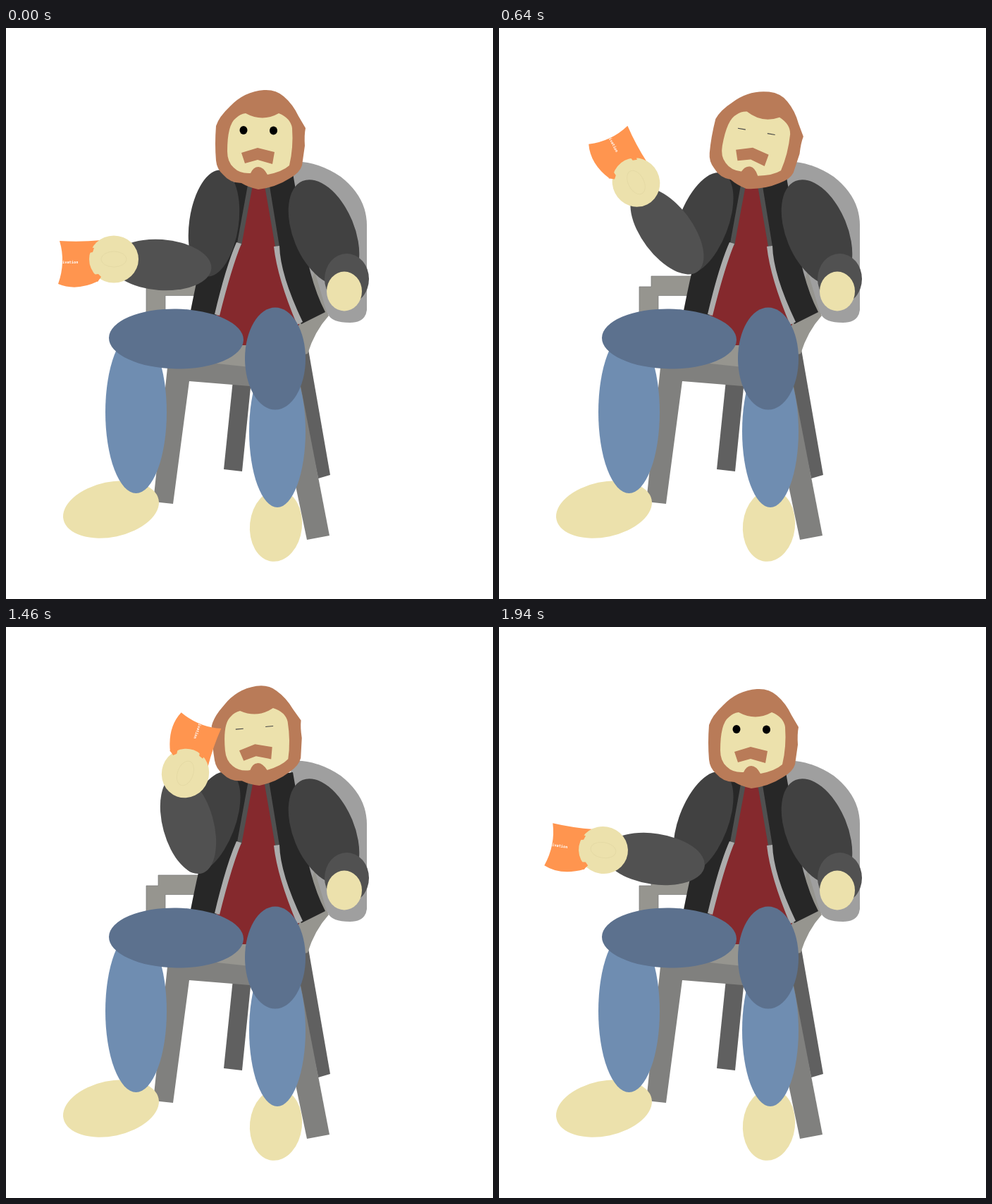
An HTML page for the animation above (2020 ms loop, 691x810 px).

```html
<!DOCTYPE html>
<html lang="en">
<head>
<meta charset="utf-8">
<title>Snack in a chair</title>
<style>
  html, body { margin: 0; width: 100%; height: 100%; overflow: hidden; background: #fff; }
  svg { display: block; width: 691px; height: 810px; }
  .skin { fill: #ece1ac; }
  .hair { fill: #b97b58; }
  .frame { fill: #96958f; }
  .leg { fill: #80807e; }
  .back-leg { fill: #606060; }
  .jacket { fill: #272727; }
  .collar { fill: #505050; }
  .lining { fill: #acacac; }
  .sleeve { fill: #414141; }
  .cuff { fill: #515151; }
  .thigh { fill: #5c718e; }
  .shin { fill: #6f8db1; }
  .bag { fill: #ff954f; }
  text { font: bold 5.3px "DejaVu Sans Mono", monospace; fill: #fff; }
</style>
</head>
<body>
<svg viewBox="0 0 691 810">
  <g id="chair">
    <path fill="#9f9f9f" d="M408 190Q440 188 475 211Q512 240 512 280V400Q510 418 488 418Q462 418 457 406L430 406V300L400 220Z"/>
    <path class="back-leg" d="M322 500L348 500L335 629L309 626Z"/>
    <path class="back-leg" d="M424 462L429 456L460 634L443 639L415 505Z"/>
    <path class="leg" d="M229 482L300 472L346 478V508L260 501L237 675L209 672Z"/>
    <path class="leg" d="M390 550L418 508L459 720L427 726Z"/>
    <path class="frame" d="M290 475L335 445L415 415L438 345L455 403L458 408Q438 430 428 462L346 481Z"/>
    <path class="frame" stroke="#777" stroke-width=".7" d="M199 367H216V352H285V379.500H226V410H199Z"/>
  </g>

  <g id="torso">
    <path class="jacket" d="M330 205L280 320Q272 350 262 401L298 409L345 330L351 212Z"/>
    <path class="jacket" d="M366 212L407 206L418 270Q428 355 453 403L419 420L380 320Z"/>
    <path fill="#85292d" d="M350 212H368L383 308Q390 350 416 421L380 450H325L299 407Q316 345 331 305Z"/>
    <path class="collar" d="M345 212L352 212L334 309L328 305Z"/>
    <path class="collar" d="M365 212L372 212L388 310L382 310Z"/>
    <path class="lining" d="M327 304L334 306Q320 340 303 408L296 406Q312 338 327 304Z"/>
    <path class="lining" d="M380 310L388 309Q389 350 421 417L413 421Q385 355 380 310Z"/>
  </g>

  <g id="legs">
    <ellipse class="skin" rx="69" ry="39" transform="translate(149 683) rotate(-12)"/>
    <ellipse class="skin" rx="37" ry="51" transform="translate(383 706) rotate(6)"/>
    <ellipse class="shin" cx="184.500" cy="545" rx="43.500" ry="115"/>
    <ellipse class="shin" cx="385" cy="572" rx="40" ry="108"/>
    <ellipse class="thigh" rx="95.500" ry="42.500" transform="translate(241.500 441) rotate(1)"/>
    <ellipse class="thigh" cx="382" cy="469" rx="43" ry="72.500"/>
  </g>

  <g id="resting-arm">
    <ellipse class="sleeve" rx="79" ry="43.500" transform="translate(451 290) rotate(67.500)"/>
    <ellipse class="cuff" cx="483.500" cy="356" rx="31.500" ry="36"/>
    <ellipse class="skin" cx="480" cy="373.500" rx="25" ry="28"/>
  </g>

  <ellipse id="upperArm" class="sleeve" rx="35" ry="76"/>

  <g id="head">
    <path class="hair" d="M366 88Q383 87 394 97Q407 108 415 125L425 142Q423 152 424 167L420 195Q417 205 403 213Q383 226 358 229Q344 226 334 220Q318 220 308 208Q299 200 298 188Q296 165 298 139Q302 126 318 111Q338 90 366 88Z"/>
    <path class="skin" d="M326 128Q332 122 340 121Q364 134 387 121Q404 128 406 142Q408 170 402 195Q392 204 371 208Q365 197 358 197Q351 197 347 206Q332 207 323 198Q314 190 314 175Q314 137 326 128Z"/>
    <path class="hair" d="M334 177L357 170L381 176L378 193L357 187L339 192Z"/>
    <g id="eyesOpen">
      <ellipse cx="337" cy="145" rx="5.500" ry="6"/>
      <ellipse cx="379.500" cy="145.500" rx="5.500" ry="6"/>
    </g>
    <path id="eyesShut" d="M331.500 146.500H342.500M374 146.500H385" stroke="#444" stroke-width="1.100"/>
  </g>

  <ellipse id="forearm" class="cuff" rx="72" ry="36"/>

  <g id="hand">
    <path class="bag" d="M-77 -26Q-68 4 -79 35Q-53 46 -22 31L-18 -27Q-48 -24 -77 -26Z"/>
    <text x="-73" y="6">ivation</text>
    <ellipse class="skin" rx="35" ry="33.500"/>
    <ellipse rx="18" ry="11" fill="none" stroke="#e5daa5"/>
    <path class="bag" d="M-35 -17L-28 -16L-30 -10L-35 -9ZM-31 22L-22 21L-18 25L-23 32Z"/>
  </g>
</svg>
<script>
  const part = id => document.getElementById(id);

  // Each placement is [x, y, degrees].
  const SHOULDER_LOW = [295, 277, 8], SHOULDER = [290, 277, 21];
  const HEAD_STRAIGHT = [360, 190, 0], HEAD_TILTED = [359.5, 190, 10], HEAD_BACK = [358, 186, -5];

  const pose = (upperArm, forearm, hand, head, awake = false) =>
    ({ upperArm, forearm, hand, head, awake });

  const poses = {
    low:   pose(SHOULDER_LOW, [219.5, 336, 4], [153, 328, 0], HEAD_STRAIGHT, true),
    shake: pose(SHOULDER, [220.5, 329, 8.5], [148, 316.5, 9.4], HEAD_STRAIGHT, true),
    lift:  pose(SHOULDER, [225, 309, 27], [156.5, 272, 31], HEAD_STRAIGHT),
    raise: pose(SHOULDER, [238.5, 288, 53], [194.5, 219, 62.8], HEAD_TILTED),
    near:  pose(SHOULDER, [258.5, 280, 74.5], [254.5, 207.5, 110], HEAD_BACK),
    eat:   pose(SHOULDER, [285, 277, 99], [293, 216, 134], HEAD_BACK)
  };

  const steps = [
    [0, "low"], [80, "shake"], [160, "low"], [240, "shake"], [320, "low"], [400, "shake"],
    [480, "lift"], [640, "raise"], [800, "near"], [960, "eat"],
    [1460, "near"], [1620, "raise"], [1780, "lift"], [1940, "shake"]
  ];
  const LOOP = 2020;

  function place(id, [x, y, angle], pivot = "") {
    part(id).setAttribute("transform", `translate(${x} ${y}) rotate(${angle}) ${pivot}`);
  }

  function show({ upperArm, forearm, hand, head, awake }) {
    place("upperArm", upperArm);
    place("forearm", forearm);
    place("hand", hand);
    place("head", head, "translate(-360 -190)");
    part("eyesOpen").style.display = awake ? "" : "none";
    part("eyesShut").style.display = awake ? "none" : "";
  }

  const start = performance.now();
  function tick() {
    const time = (performance.now() - start) % LOOP;
    const [, name] = steps.findLast(([from]) => from <= time);
    show(poses[name]);
    requestAnimationFrame(tick);
  }
  tick();
</script>
</body>
</html>
```
